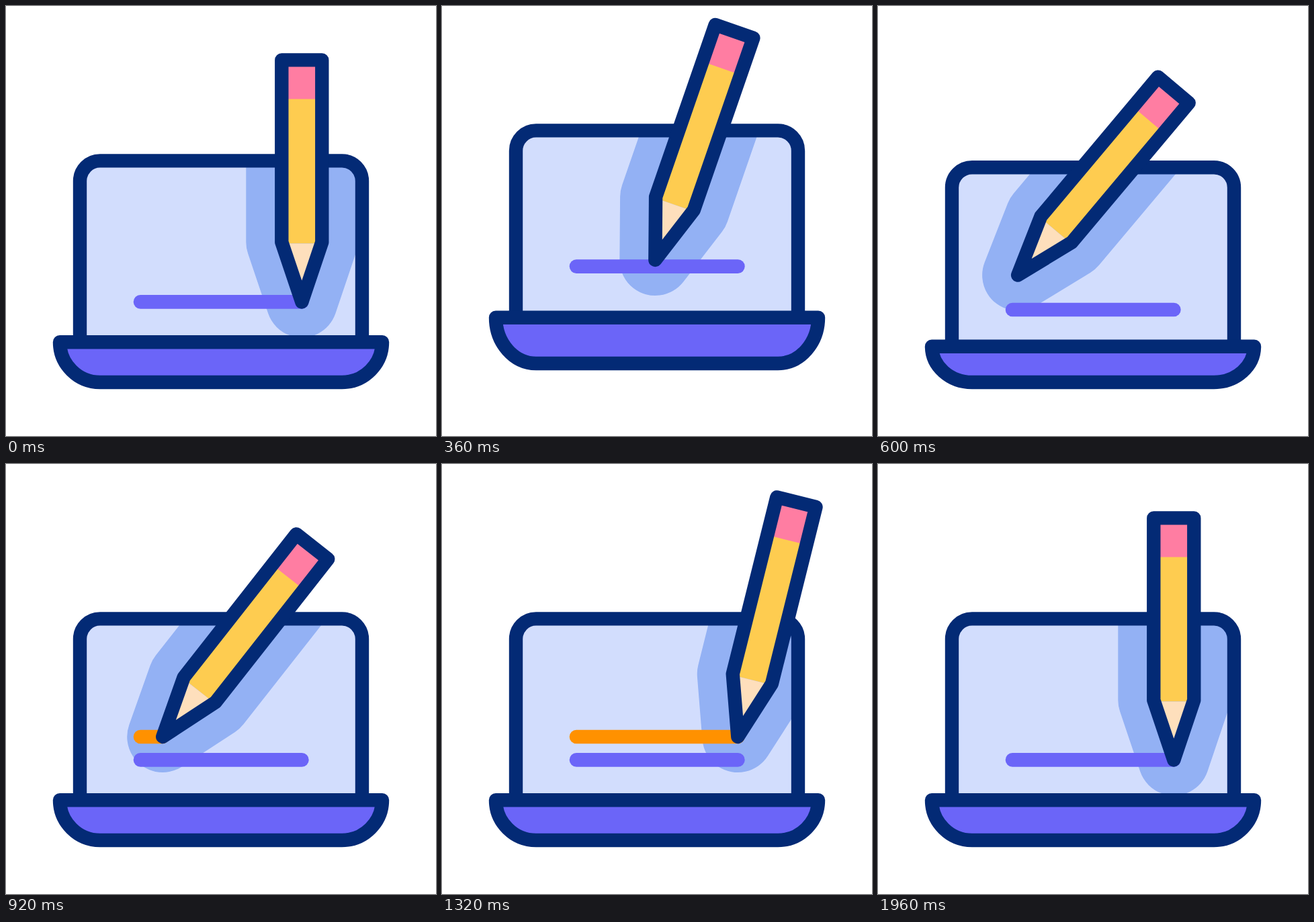
An HTML page that plays this animation: 640x640 px, repeating every 2000 ms.

```html
<!DOCTYPE html>
<html lang="en">
<head>
<meta charset="utf-8">
<title>Pencil drawing on a laptop</title>
<style>
  html, body { margin: 0; height: 100%; overflow: hidden; background: #fff; }
  svg { display: block; width: 100%; height: 100%; }
  .ink { stroke: #032a75; stroke-width: 20.4; stroke-linejoin: round; }
  .line { stroke-width: 20.6; stroke-linecap: round; }
</style>
</head>
<body>
<svg viewBox="0 0 640 640">
  <defs>
    <path id="lid"/>
    <path id="body" d="M-30-360H30V-89L0 0L-30-89Z"/>
    <clipPath id="screen"><use href="#lid"/></clipPath>
  </defs>
  <use href="#lid" fill="#d2ddfd"/>
  <g clip-path="url(#screen)">
    <use href="#body" id="shadow" fill="#93b1f4" stroke="#93b1f4" stroke-width="106" stroke-linejoin="round"/>
  </g>
  <path id="purple" class="line" stroke="#6b65f8"/>
  <path id="orange" class="line" stroke="#ff9100"/>
  <use href="#lid" class="ink" fill="none"/>
  <path id="base" class="ink" fill="#6b65f8"/>
  <g id="pencil">
    <path fill="#fecc50" d="M-30-360H30V-87H-30Z"/>
    <path fill="#ff7da2" d="M-30-360H30V-302H-30Z"/>
    <path fill="#fedfbc" d="M-29-87H29L0 0Z"/>
    <use href="#body" class="ink" fill="none"/>
  </g>
</svg>
<script>
const $ = id => document.getElementById(id);

// Keys are [ms, value]; the curve between them is smooth and never overshoots.
function track(...keys) {
  const secant = i => keys[i] && keys[i + 1]
    ? (keys[i + 1][1] - keys[i][1]) / (keys[i + 1][0] - keys[i][0]) : 0;
  const slope = i => {
    const a = secant(i - 1), b = secant(i);
    return a * b > 0 ? 2 * a * b / (a + b) : 0;
  };
  return t => {
    if (t <= keys[0][0]) return keys[0][1];
    const i = keys.findIndex((k, n) => keys[n + 1] && t < keys[n + 1][0]);
    if (i < 0) return keys[keys.length - 1][1];
    const [t0, v0] = keys[i], [t1, v1] = keys[i + 1];
    const d = t1 - t0, s = (t - t0) / d, r = 1 - s;
    return v0 + (v1 - v0) * s * s * (3 - 2 * s)
      + d * s * r * (r * slope(i) - s * slope(i + 1));
  };
}

const tipX = track([80, 440], [360, 317.5], [600, 208], [680, 200], [800, 200],
  [1320, 440], [1440, 440], [1600, 446], [1960, 440]);
const tipY = track([80, 440.4], [360, 378], [600, 400.5], [680, 406], [1440, 406],
  [1600, 480], [1960, 440.4]);
const tilt = track([80, 0], [360, 19], [600, 40], [680, 42], [800, 42],
  [1320, 14], [1440, 14], [1600, 9], [1960, 0]);
const fade = track([1440, 1], [1760, 0]);
// Positive values lift the laptop, negative ones squash it.
const hop = track([80, 0], [180, -.5], [360, 1], [600, -1], [800, 0],
  [1600, 0], [1710, -.6], [1960, 0]);

function draw() {
  const t = performance.now() % 2000;
  const h = hop(t), x = tipX(t);
  const shift = (up, down) => h > 0 ? -up * h : -down * h;
  const lid = 230.4 + shift(45, 9.8);
  const line = shift(52.8, 11.6);
  const top = 500.3 + shift(36.5, 6.4);
  const bottom = 560 + shift(28, 0);
  const k = (bottom - top) * .45;

  $('lid').setAttribute('d', `M110 ${top}V${lid + 30}Q110 ${lid + 30} 110 ${lid + 30}
    A30 30 0 0 1 140 ${lid}H500A30 30 0 0 1 530 ${lid + 30}V${top}`);
  $('base').setAttribute('d', `M80 ${top}H560C560 ${bottom - k} 533 ${bottom} 500 ${bottom}
    H140C107 ${bottom} 80 ${bottom - k} 80 ${top}Z`);
  $('purple').setAttribute('d', `M200 ${440.4 + line}H440.4`);
  $('orange').setAttribute('d', `M200 ${406 + line}H${t < 1320 ? x : 440.4}`);
  $('orange').setAttribute('opacity', t < 800 ? 0 : fade(t));

  const pose = `translate(${x + .3} ${tipY(t)}) rotate(${tilt(t)})`;
  $('pencil').setAttribute('transform', pose);
  $('shadow').setAttribute('transform', pose);
  requestAnimationFrame(draw);
}
draw();
</script>
</body>
</html>
```
